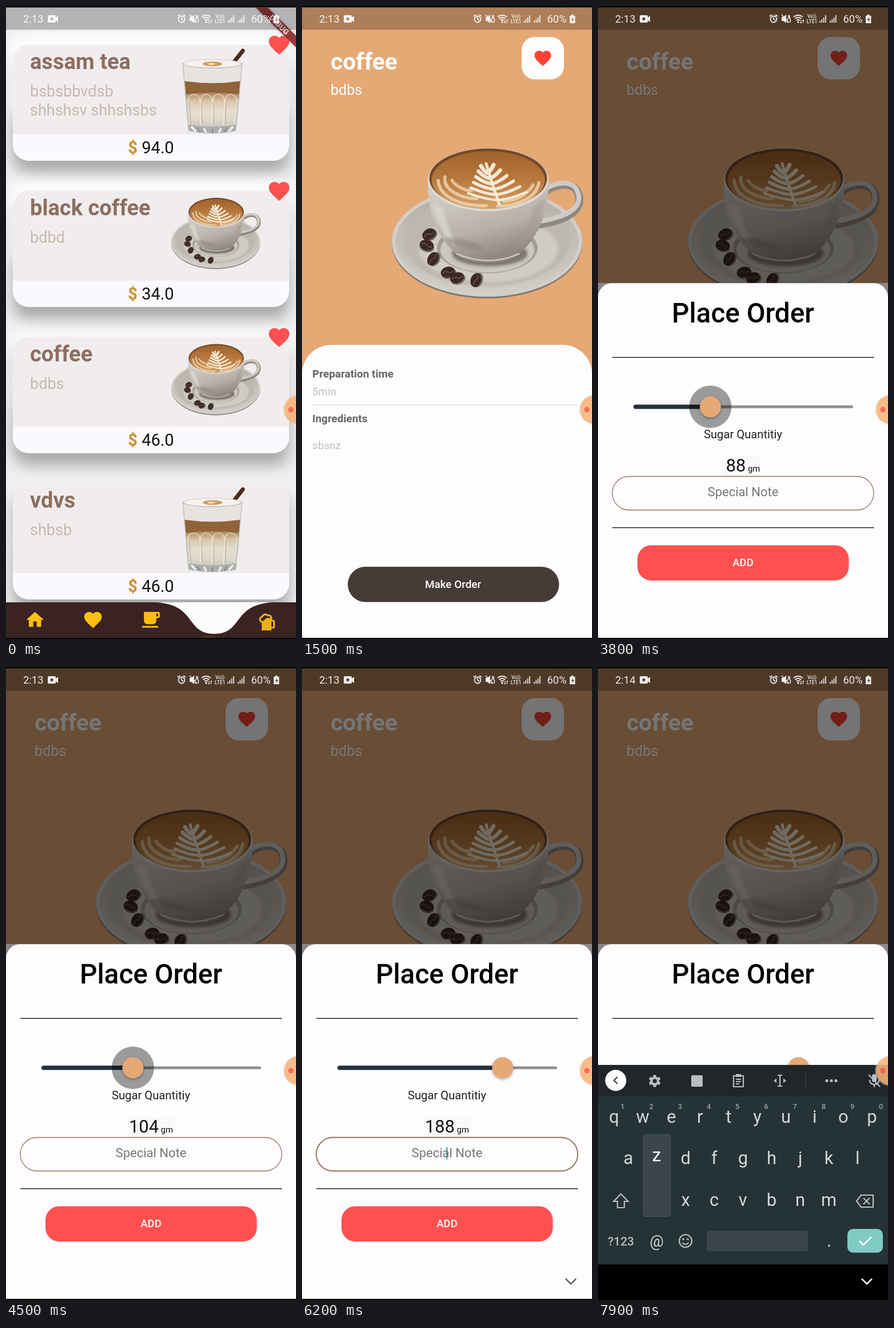
An HTML page that plays this animation: 507 by 1104 pixels, repeating every 8 s.

```html
<!DOCTYPE html>
<html lang="en">
<head>
<meta charset="utf-8">
<title>Coffee order</title>
<style>
html, body { margin: 0; width: 100%; height: 100%; overflow: hidden; background: #000 }
svg { display: block; width: 100%; height: 100%; font-family: Roboto, sans-serif }
</style>
</head>
<body>
<svg id="stage" viewBox="0 0 507 1104"></svg>
<script>
const HEART = 'M12 21.35l-1.45-1.32C5.4 15.36 2 12.28 2 8.5 2 5.42 4.42 3 7.5 3c1.74 0 3.41.81 4.5 2.09C13.09 3.81 14.76 3 16.5 3 19.58 3 22 5.42 22 8.5c0 3.78-3.4 6.86-8.55 11.54z';
const HOME = 'M10 20v-6h4v6h5v-8h3L12 3 2 12h3v8z';
const CUP = 'M2 21v-2h18v2zM20 8V5h-2v3zM20 3a2 2 0 0 1 2 2v3a2 2 0 0 1-2 2h-2v3a4 4 0 0 1-4 4H8a4 4 0 0 1-4-4V3z';
const GLASS = 'M4.5 1.5h15l-1.7 21H6.2zM6.8 3.500l.4 4.500h9.600l.4-4.500zM7.6 11l.8 9.500h7.200l.2-2.500h-5z';
const BEER = 'M19 9h-1.56c.35-.59.56-1.27.56-2 0-2.21-1.79-4-4-4-.34 0-.66.05-.98.13C12.2 2.45 11.16 2 10 2 8.11 2 6.49 3.11 5.73 4.71 4.15 5.26 3 6.74 3 8.5c0 1.86 1.28 3.41 3 3.86V21h11v-2h2c1.1 0 2-.9 2-2v-6c0-1.1-.9-2-2-2zM7 10.5c-1.1 0-2-.9-2-2 0-.85.55-1.6 1.37-1.88l.8-.27.36-.76C8 4.62 8.94 4.02 10 4.02c.79 0 1.39.35 1.74.65l.78.65S13.16 5 13.99 5c1.1 0 2 .9 2 2h-3C9.67 7 9.15 10.5 7 10.5zM19 17h-2v-6h2z';
const GEAR = 'M19.4 13a7 7 0 0 0 0-2l2.1-1.6-2-3.5-2.5 1a7 7 0 0 0-1.7-1L15 3.3h-4l-.4 2.6a7 7 0 0 0-1.7 1l-2.5-1-2 3.5L6.500 11a7 7 0 0 0 0 2l-2.100 1.600 2 3.500 2.500-1a7 7 0 0 0 1.700 1l.4 2.600h4l.4-2.600a7 7 0 0 0 1.700-1l2.500 1 2-3.500zM13 9a3 3 0 1 1 0 6 3 3 0 0 1 0-6z';

const rect = (x, y, w, h, fill, r = 0, more = '') =>
  `<rect x="${x}" y="${y}" width="${w}" height="${h}" rx="${r}" fill="${fill}" ${more}/>`;
const oval = (x, y, rx, ry, fill, more = '') =>
  `<ellipse cx="${x}" cy="${y}" rx="${rx}" ry="${ry}" fill="${fill}" ${more}/>`;
const path = (d, fill, more = '') => `<path d="${d}" fill="${fill}" ${more}/>`;
const line = (d, color, width, more = '') =>
  path(d, 'none', `stroke="${color}" stroke-width="${width}" ${more}`);
const text = (x, y, size, str, fill, more = '') =>
  `<text x="${x}" y="${y}" font-size="${size}" fill="${fill}" ${more}>${str}</text>`;
const mid = (x, y, size, str, fill, more = '') =>
  text(x, y, size, str, fill, 'text-anchor="middle" ' + more);
const icon = (x, y, scale, d, fill) =>
  path(d, fill, `fill-rule="evenodd" transform="translate(${x} ${y}) scale(${scale}) translate(-12 -12)"`);
const group = (content, more = '') => `<g ${more}>${content}</g>`;
const gradient = (id, dir, ...stops) => `<linearGradient id="${id}" ${dir}>` + stops.map((c, i) =>
  `<stop offset="${i / (stops.length - 1)}" stop-color="${c}"/>`).join('') + '</linearGradient>';
const BOLD = 'font-weight="700"', MEDIUM = 'font-weight="500"', ROUND = 'stroke-linecap="round"';
const BLUR = 'filter="url(#blur)"', SOFT = 'filter="url(#soft)"', DOWN = 'x2="0" y2="1"';

const defs = `<defs>
  <filter id="blur" x="-20%" y="-40%" width="140%" height="180%"><feGaussianBlur stdDeviation="13"/></filter>
  <filter id="soft" x="-50%" y="-50%" width="200%" height="200%"><feGaussianBlur stdDeviation="2.5"/></filter>` +
  gradient('body', 'x2=".4" y2="1"', '#d6d1ca', '#cbc5be', '#b9b2aa', '#8f8780') +
  gradient('saucer', DOWN, '#b3ada6', '#c3beb7', '#d2cdc7') +
  gradient('brew', DOWN, '#a0622c', '#b97a3e', '#d6a269') +
  gradient('milk', DOWN, '#ab875c', '#d8c6aa', '#e5ddcf', '#dfdacf', '#c9c5bb') +
  '</defs>';

function cupPhoto() {
  let art = '';
  for (let i = 0; i < 6; i++) {
    const x = 324 + i * 3.500, y = 279 + i * 9.500, w = 11 + i * 8;
    art += line(`M${x - w} ${y}q${w * .6} 11 ${w} 12q${w * .4} -1 ${w} -14`, '#f6e8d4', 7 - i * .5, ROUND);
  }
  const beans = [[222, 398, -30], [218, 417, 15], [229, 441, -60], [255, 464, -15], [271, 474, -20], [304, 478, -70]];
  return oval(323.500, 414, 166.500, 96, '#7f7972') + oval(323.500, 411, 166.500, 96, '#d2cec8') +
    oval(323.500, 411, 160, 90, 'url(#saucer)') + oval(322, 410, 146, 79, '#bdb7b0', SOFT) +
    oval(326, 424, 122, 58, '#d0cbc5', SOFT) + oval(324, 422, 88, 44, '#a49d96') + oval(324, 425, 82, 40, '#cbc6c0') +
    oval(328, 432, 66, 22, '#7d766f', SOFT) +
    line('M425 324C448 306 484 306 485 337C486 366 440 378 406 382', '#8f8881', 14) +
    line('M425 320C448 303 483 303 484 335C484 362 440 372 406 377', '#cfcac4', 8.500) +
    path('M220 300C218 360 236 400 264 427C282 454 366 455 386 427C414 398 432 362 431 300z', 'url(#body)') +
    path('M230 345C234 380 250 404 270 420C262 396 248 370 246 352z', '#e3dfda', `opacity=".6" ${SOFT}`) +
    path('M404 352C400 385 386 410 372 424C396 410 420 372 424 335z', '#a59d96', `opacity=".6" ${SOFT}`) +
    oval(285, 415, 34, 7, '#857d76', `opacity=".45" transform="rotate(14 285 415)" ${SOFT}`) +
    line('M270 432Q326 456 380 432', '#d5d0ca', 2) +
    oval(325.500, 303, 105.500, 55, '#ddd9d3') + oval(325.500, 300.500, 103, 52, '#74492a') +
    oval(325.500, 303.500, 99, 50.500, 'url(#brew)') +
    line('M238 304C240 334 280 350 322 348M250 298C246 322 280 336 306 336M262 304C272 318 288 322 296 322' +
      'M414 308C410 334 378 349 342 349M404 312C394 330 372 340 352 341', '#eed5b2', 5.500, `${ROUND} opacity=".8"`) +
    art + line('M322 275Q332 310 345 346', '#f6e8d4', 5, ROUND) +
    beans.map(([x, y, a]) => group(oval(x + 1, y + 3, 13, 9, '#746c65') + oval(x, y, 12.500, 9.200, '#3b2823') +
      line(`M${x - 10} ${y}q5 -4 10 0t10 0`, '#6b5047', 1.800), `transform="rotate(${a} ${x} ${y})"`)).join('');
}

function glassPhoto() {
  let facets = '';
  for (let i = 0; i < 4; i++) {
    const x = 318 + i * 21.500, lean = (1.500 - i) * 1.500;
    facets += line(`M${x + lean} 208L${x} 166q1 -11 10 -12q10 1 11.500 12L${x + 20 + lean} 208`, '#f1ebdd', 1.500, 'opacity=".7"') +
      line(`M${x + 3 + lean} 206L${x + 2} 168`, '#a8977d', 1.500, 'opacity=".5"');
  }
  return line('M396 101L414 78', '#4a2b20', 7, ROUND) +
    path('M309 99L319 218Q361 226 402 218L413 99z', '#b9bab5') +
    path('M310 102L313 138H409L412 102z', '#e6e3e0') +
    path('M312 131Q361 138 410 131L407 160Q361 152 315 160z', '#8f6238') +
    path('M315 154Q361 148 407 154L400 209Q361 215 321 209z', 'url(#milk)') + facets +
    path('M320 207Q361 214 402 207L401 218Q361 226 320 218z', '#abafac') +
    line('M324 210l8 9M346 213l4 8M376 213l-4 8M397 210l-8 9', '#eef1f0', 3.500) +
    line('M334 212l6 8M361 214v8M387 212l-6 8', '#7f8683', 2) +
    oval(361, 101, 52, 8, '#c9c6c3') + oval(361, 100.500, 49.500, 6.800, '#f4f1ee') +
    oval(361, 101, 17, 4, '#cf9a58') + oval(359, 101, 7, 1.600, '#f3dfc3') +
    line('M309 100L319 216M413 100L402 216', '#c3c6c4', 1.500);
}

const smallCup = group(cupPhoto(), 'transform="translate(215.500 -38.500) scale(.467 .475)"');

function card(i, name, notes, price, photo, liked) {
  return group(
    rect(12, 87, 483, 205, '#a2a2a2', 28, `${BLUR} opacity=".9"`) +
    rect(6, 50, 490, 150, '#fff', 28, `${BLUR} opacity="${1 - i * i * .09}"`) +
    rect(12, 67, 483, 203, '#f1edee', 28) +
    path('M12 224H495V242a28 28 0 0 1-28 28H40a28 28 0 0 1-28-28z', '#fbf9fd') +
    text(42, 110, 38, name, '#8d6e60', BOLD) +
    notes.map((s, k) => text(42, 158 + 33 * k, 27, s, '#c8b8ae')).join('') + photo +
    mid(253.500, 256.500, 29, `<tspan fill="#cf9030" ${BOLD}>$</tspan> ${price}`, '#111') +
    (liked ? icon(477.500, 68, 1.800, HEART, '#fd5150') : ''),
    `transform="translate(0 ${255 * i})"`);
}

const list = rect(0, 0, 507, 1104, '#f0eff0') +
  card(0, 'assam tea', ['bsbsbbvdsb', 'shhshsv shhshsbs'], '94.0', glassPhoto(), true) +
  card(1, 'black coffee', ['bdbd'], '34.0', smallCup, true) +
  card(2, 'coffee', ['bdbs'], '46.0', smallCup, true) +
  card(3, 'vdvs', ['shbsb'], '46.0', glassPhoto(), false) +
  rect(0, 1040, 507, 64, '#fdfcfd') + '<g id="nav"></g>';

const banner = path('M437 3H458L507 52V72z', '#555', `opacity=".5" ${SOFT}`) +
  path('M437 3H458L507 52V72z', '#962c2c', 'opacity=".9"') +
  mid(0, 4.600, 13.300, 'DEBUG', '#f4e6e6', 'font-weight="900" transform="translate(477.500 32.500) rotate(45)"');

const detail = rect(0, 3, 507, 1400, '#e6a875') +
  text(50, 111, 40.600, 'coffee', '#fff', BOLD) + text(50, 155, 25, 'bdbs', '#fff') +
  rect(384, 54, 74, 74, '#fefdfe', 23) + icon(421, 91, 1.450, HEART, '#f94335') + cupPhoto() +
  rect(0, 591, 507, 800, '#fefdfe', 51) +
  text(18, 648, 18.900, 'Preparation time', '#666', BOLD) + text(18, 679, 18.700, '5min', '#bfbec0') +
  rect(18, 695.500, 464, 1.300, '#dcdbdd') +
  text(18, 726, 18.900, 'Ingredients', '#666', BOLD) + text(18, 773, 19, 'sbsnz', '#bfbec0') +
  rect(80, 978, 369.500, 61.500, '#463c37', 30.700) + mid(264, 1015, 18.900, 'Make Order', '#fff', MEDIUM);

const sheet = rect(0, 0, 507, 1104, '#000', 0, 'opacity=".54"') + rect(0, 483, 507, 30, '#8b8786') +
  path('M0 1104V508a24.500 24.500 0 0 1 24.500-24.500H482.500a24.500 24.500 0 0 1 24.500 24.500V1104z', '#fefcfe') +
  mid(253.500, 552, 47.600, 'Place Order', '#000', MEDIUM) +
  rect(25, 612, 457.500, 1.600, '#333') + rect(25, 909, 457.500, 1.600, '#333') +
  rect(62, 696.500, 384, 5, '#8f9091', 2.500) + rect(62, 695.300, 0, 7.400, '#22303a', 3.700, 'id="filled"') +
  '<g id="thumb">' + oval(0, 699, 37, 37, '#000', 'id="halo" opacity=".39"') +
  oval(0, 701, 18.500, 18.500, '#000', `opacity=".3" ${SOFT}`) +
  oval(0, 699, 18.500, 18.500, '#e6a875') + '</g>' +
  mid(253.500, 754, 20.200, 'Sugar Quantitiy', '#222') +
  rect(0, 785, 62, 35, '#faf8f8', 0, 'id="amountBox"') +
  mid(253.500, 812, 30.800, '', '#111', 'id="amount"') +
  rect(25, 820.500, 457, 58.500, 'none', 29, 'id="field" stroke="#94765f"') +
  mid(253.500, 855, 22, 'Special Note', '#777') +
  rect(252, 837, 2.500, 22, '#2a9d96', 1, 'id="cursor" opacity=".8"') +
  rect(69, 940.500, 369.500, 61.500, '#ff5050', 24) + mid(253.500, 977, 18.500, 'ADD', '#fff', MEDIUM);

const signal = x => path(`M${x} 29v-3h2v3zm3.300 0v-6h2v6zm3.300 0v-9h2v9zm3.300 0v-13h2v13z`, '#fff', 'opacity=".85"');
const status = rect(0, 0, 507, 41.500, '#000', 0, 'opacity=".25"') + group(
  text(30, 29, 18.400, '', '#fff', 'id="clock"') +
  path('M75 16h10q2 0 2 2v2l4-3v11l-4-3v2q0 2-2 2H75q-2 0-2-2V18q0-2 2-2zm5 4a2.500 2.500 0 1 0 .1 0z', '#fff', 'fill-rule="evenodd"') +
  line('M312.500 23a5.500 5.500 0 1 1-11 0a5.500 5.500 0 1 1 11 0zM307 19.500V23l3 2M300 18l4-3M314 18l-4-3', '#fff', 1.800) +
  path('M321 19h3l5-4v15l-5-4h-3z', '#fff') + line('M321 15l13 14M332 16q3 3 0 6t0 7M335.500 16q-2 3 0 6t0 7', '#fff', 1.500) +
  line('M342 19q8-6 16 0M344.500 22q5.500-4 11 0M347 25q3-2 6 0', '#fff', 1.900) + oval(350, 28, 1.700, 1.700, '#fff') +
  line('M355 24v6m-1.500-1.500l1.500 1.500M358.500 30v-6m1.500 1.500l-1.500-1.500', '#fff', 1.200) +
  mid(374, 21, 8.500, 'Vo))', '#fff', MEDIUM) + mid(374, 30, 8.500, 'LTE1', '#fff', MEDIUM) + signal(387) + signal(405) +
  text(428.500, 29, 18.400, '60%', '#fff') +
  path('M470.500 15h4v2h3v13h-9.500V17h2.500zM474 19l-3.500 5h2.500l-1 4 4-5h-2.800z', '#fff', 'fill-rule="evenodd"'),
  'opacity=".9"');

const INK = '#d3d8da', KEY = '#3a464b', DIM = '#b9bfc1';
const keyRow = (keys, x, y) => [...keys].map((k, i) => mid(x + 50.100 * i, y, 31, k, INK)).join('');
const stroke = d => line(d, DIM, 2.200);
const keyboard = rect(0, 694, 507, 56, '#20262a') + rect(0, 749, 507, 294, '#253236') + rect(0, 1042, 507, 500, '#000') +
  oval(31, 721, 18.500, 18.500, '#fff') + line('M34 715l-6 6 6 6', '#444', 2.400) +
  icon(98, 722, 1.200, GEAR, DIM) + rect(163, 712, 20, 20, DIM, 2) +
  stroke('M237 713h17v19h-17zM241 719h9M241 723h9M241 727h6') + rect(241, 710, 9, 5, DIM) +
  stroke('M314 712h8M314 731h8M318 712v19') + path('M307 721.500l5-4v8zM329 721.500l-5-4v8z', DIM) +
  rect(362.500, 708, 1.200, 27, '#394144') + [400, 408, 416].map(x => oval(x, 721.500, 2.600, 2.600, DIM)).join('') +
  rect(479, 710, 8, 14, DIM, 4) + stroke('M474.500 720q1 8 8.500 8t8.500-8M483 728v5M473 711l20 21') +
  keyRow('qwertyuiop', 28, 795) +
  [...'1234567890'].map((n, i) => mid(43 + 50.200 * i, 771, 13, n, '#9ba3a6', MEDIUM)).join('') +
  keyRow('asdfghjkl', 53, 867) + keyRow('zxcvbnm', 103, 940) +
  stroke('M40 919l-12.500 13h6.500v11h12v-11h6.500z') +
  stroke('M460 921h21v21h-21l-8-10.500zM464 926l11 11M475 926l-11 11') +
  mid(40, 1009, 21, '?123', DIM, MEDIUM) + mid(102.500, 1011, 27, '@', INK) +
  stroke('M164 1001a11 11 0 1 1-22 0a11 11 0 1 1 22 0zM147.500 1004q5.500 6 11 0') +
  oval(149, 998, 1.800, 1.800, DIM) + oval(157, 998, 1.800, 1.800, DIM) +
  rect(190, 983, 177, 36, KEY, 4) + mid(404, 1011, 31, '.', INK) +
  rect(436, 980, 62, 41.500, '#80cbc4', 10) + line('M457 1001l7 7 14-14', '#fff', 2.600) +
  group(rect(78, 816, 50, 146, '#151d20', 6, 'opacity=".5"') + rect(78, 814, 50, 146, KEY, 6) + mid(102.500, 862, 32, 'z', '#fff'), 'id="pressed"');

const stage = document.getElementById('stage');
stage.innerHTML = defs + list + banner + group(detail, 'id="detail"') + group(sheet, 'id="sheet"') + status +
  group(keyboard, 'id="keyboard"') + line('M461 1067l9 9 9-9', '#666', 2.600, 'id="chevron"') +
  group(oval(511, 704, 27, 27, '#ddd', 'opacity=".4"') + oval(511, 704, 25, 25, '#fab070', 'opacity=".8"') +
    oval(498, 704, 4.700, 4.700, '#f4504c', 'opacity=".75"')) +
  rect(0, 0, 507, 2.500, '#000') + rect(0, 1102, 507, 2, '#000');

const el = {};
for (const node of stage.querySelectorAll('[id]')) el[node.id] = node;
const set = (id, attr, value) => el[id].setAttribute(attr, value);
const show = (id, on) => set(id, 'display', on ? 'inline' : 'none');
const clamp = x => Math.max(0, Math.min(1, x));

// Curved bar whose notch follows the selected tab.
function drawNav(pos) {
  const tab = 101.400, w = 507, top = 1040;
  let out = path(`M0 ${top}H${pos - .2 * w}C${pos - .06 * w} ${top + 4.600} ${pos - .1 * w} ${top + 55} ${pos} ${top + 55}` +
    `C${pos + .1 * w} ${top + 55} ${pos + .06 * w} ${top + 4.600} ${pos + .2 * w} ${top}H${w}V1104H0z`, '#3a2322');
  [HOME, HEART, CUP, GLASS, BEER].forEach((d, i) => {
    const x = tab * (i + .5), gap = Math.min(1, Math.abs(pos - x) / tab);
    out += group(icon(x, 1070.500 + (1 - gap) * 49, 1.540, d, '#fdc010'), `opacity="${gap}"`);
  });
  const hide = 1 - Math.abs(pos - 3.500 * tab) / tab, y = 1054 + 98.500 * Math.max(0, hide);
  el.nav.innerHTML = out + oval(pos, y, 28, 28, '#000') + icon(pos, y, 1.540, CUP, '#fdc010');
}

// [time, grams] along the drag, joined by straight runs.
const drag = [[2800, 0], [3100, 71], [4500, 104], [5800, 188]];
function grams(t) {
  let value = 0;
  for (let i = 1; i < drag.length; i++) {
    const [t0, a] = drag[i - 1], [t1, b] = drag[i];
    value += (b - a) * clamp((t - t0) / (t1 - t0));
  }
  return value;
}

function draw(t) {
  drawNav(253.500 + 111.500 * (1 - clamp(t / 300)) ** 2);

  const p = t >= 800 ? 1 : clamp((t - 535) / 300);
  set('detail', 'opacity', p ** 1.500);
  set('detail', 'transform', `translate(0 ${276 * (1 - p * p) ** 5})`);

  const value = grams(t), x = 62 + value * 1.536, half = value >= 99.500 ? 39 : value >= 9.500 ? 31 : 23;
  show('sheet', t >= 1700);
  set('filled', 'width', x - 62);
  set('thumb', 'transform', `translate(${x} 0)`);
  show('halo', t >= 2600 && t < 5800);
  set('amountBox', 'x', 253.500 - half);
  set('amountBox', 'width', 2 * half);
  el.amount.innerHTML = `${Math.round(value)}<tspan font-size="14.800"> gm</tspan>`;

  const focused = t >= 6100, rise = 1 - (1 - clamp((t - 6250) / 350)) ** 3;
  set('field', 'stroke-width', focused ? 2 : 1.300);
  show('cursor', focused);
  show('keyboard', rise > 0);
  set('keyboard', 'transform', `translate(0 ${410 * (1 - rise)})`);
  show('pressed', t >= 7900);
  show('chevron', focused);
  set('chevron', 'stroke', rise > .1 ? '#fff' : '#666');
  el.clock.textContent = t < 6600 ? '2:13' : '2:14';
}

function tick() {
  draw(performance.now() % 8000);
  requestAnimationFrame(tick);
}
tick();
</script>
</body>
</html>
```
